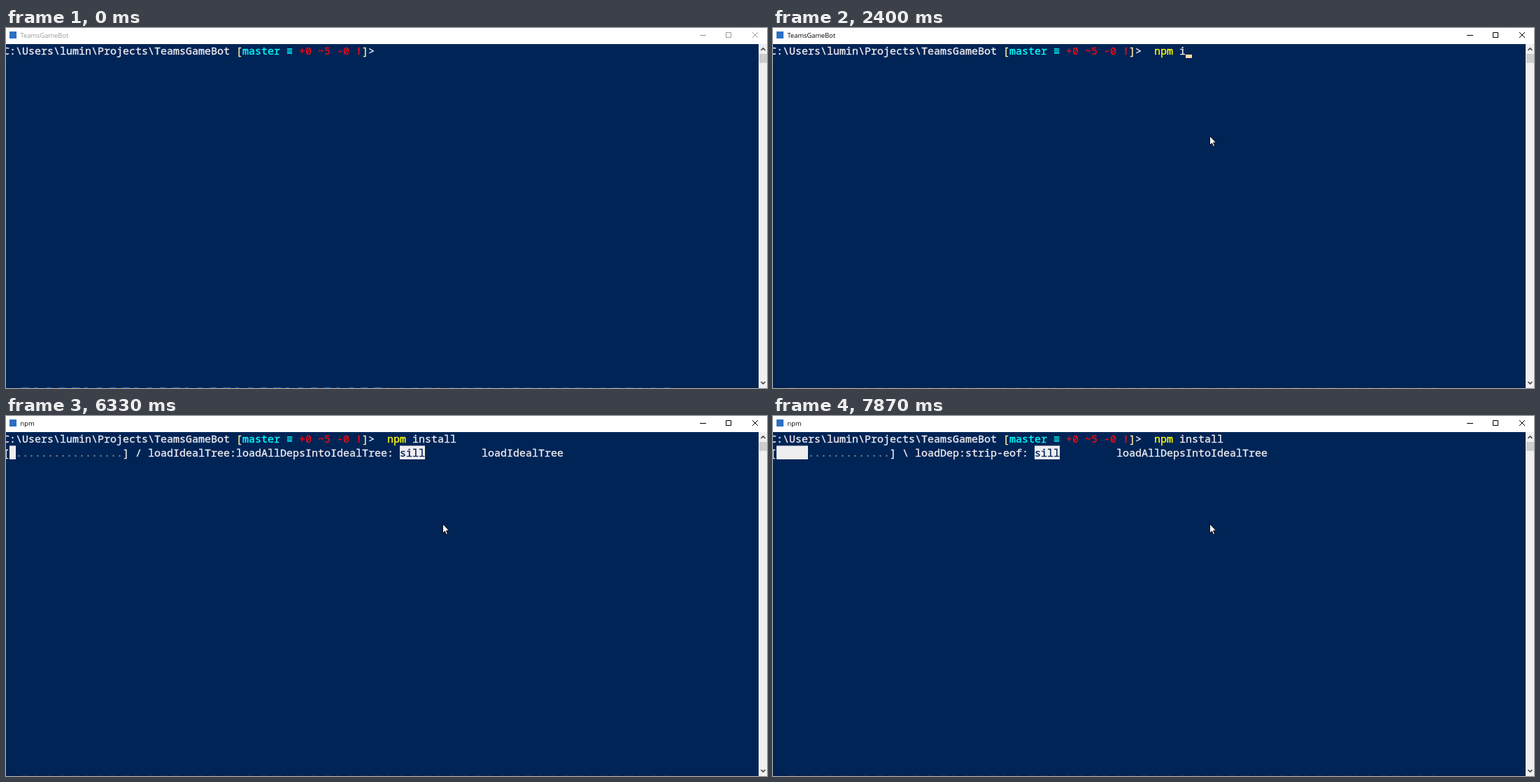
An HTML page with a canvas that plays this animation: 1088 by 515 pixels, repeating every 7.99 s.

```html
<!DOCTYPE html>
<html lang="en">
<head>
<meta charset="utf-8">
<title>Terminal</title>
<style>
  html, body { margin: 0; width: 100%; height: 100%; overflow: hidden; background: #012456; }
  canvas { display: block; }
</style>
</head>
<body>
<canvas id="stage" width="1088" height="515"></canvas>
<script>
const ctx = document.getElementById('stage').getContext('2d');
const LOOP = 7990, TICK = 106, BLINK = 550;
const CELL = 9, LEFT = -4, ROW = 19.6, BASE = 38;
const NAVY = '#012456', PALE = '#eeedf0', YELLOW = '#ffff00', CYAN = '#00ffff', BRACKET = '#f9f1a5';
const RED = '#f00a14', GREEN = '#008000', GRAY = '#7d828c', CREAM = '#fedba9';
const MONO = '15px "Noto Sans Mono", "DejaVu Sans Mono", monospace';
const SANS = '9.3px "Open Sans", "Noto Sans", sans-serif';

// Moments at which the window reacts
const FOCUS = 1080, CARET = 1630, TYPE = 2080, LAST_KEY = 2950, ENTER = 3170, NEW_LINE = 3290, RENAME = 3390;
const CARET_OFF = 3720, PREINSTALL = 4700, LOAD_TREE = 6330, LOAD_DEPS = 7210;

const COMMAND = 'npm install', COMMAND_COL = 61;
const TREE = 'loadAllDepsIntoIdealTree';
const DEPS = ['request', 'glob', 'minimatch', 'resolve', 'semver', 'execa', 'strip-eof'];
const ARROW = new Path2D('M0 0V13L3 10.3L5 15L7 14L5 9.5H9Z');

const ticks = (t, start, last) => Math.min(last, Math.floor((t - start) / TICK));
const glide = (t, start) => Math.max(0, (ticks(t, start, 4) + 1) / 5);
const easeOut = p => 1 - (1 - p) ** 2;
const mix = (a, b, p) => a + (b - a) * p;
const colX = col => LEFT + col * CELL;

function rect(x, y, w, h, color) {
  ctx.fillStyle = color;
  ctx.fillRect(x, y, w, h);
}

function stroke(path, color, width = 1) {
  ctx.strokeStyle = color;
  ctx.lineWidth = width;
  ctx.stroke(new Path2D(path));
}

// Writes text on the character grid and returns the next column
function put(col, row, text, color) {
  const x = colX(col), y = BASE + Math.round(row * ROW);
  ctx.font = MONO;
  ctx.fillStyle = ctx.strokeStyle = color;
  ctx.lineWidth = 0.35;
  ctx.fillText(text, x, y);
  ctx.strokeText(text, x, y);
  return col + text.length;
}

function block(col, count) {
  rect(colX(col), 42.5, count * CELL, 19.5, PALE);
}

function drawWindow(title, active) {
  const ink = active ? '#000' : '#999';
  rect(0, 0, 1088, 515, NAVY);
  rect(0, 0, 1088, 23, '#fff');
  rect(5, 5, 10, 10, '#2c6fc4');
  ctx.font = SANS;
  ctx.fillStyle = ink;
  ctx.fillText(title, 20.5, 14);
  stroke('M992 10.5h9M1029.5 6.5h7v7h-7zM1067 6l8 8m0-8l-8 8', ink);

  // Strip of the desktop showing along the bottom edge
  rect(0, 514, 1076, 1, '#0b1e42');
  for (let x = 22; x < 950; x += 18)
    rect(x, 514, 5 + x % 8, 1, active ? '#162b50' : x < 540 ? '#1f62b4' : '#17407c');

  rect(1076, 23, 12, 492, '#f0f0f0');
  rect(1077, 37, 11, 13, '#cdcdcd');
  stroke('M1079.5 32l3-3l3 3M1079.5 506l3 3l3-3', '#404040', 1.6);
}

function drawPrompt(typed) {
  let col = put(0, 0, 'C:\\Users\\lumin\\Projects\\TeamsGameBot ', PALE);
  col = put(col, 0, '[', BRACKET);
  col = put(col, 0, 'master ≡ ', CYAN);
  col = put(col, 0, '+0 ~5 -0 !', RED);
  col = put(col, 0, ']', BRACKET);
  put(col, 0, '>', PALE);
  const entered = COMMAND.slice(0, typed);
  col = put(COMMAND_COL, 0, entered.slice(0, 3), YELLOW);
  put(col, 0, entered.slice(3), PALE);
}

function drawProgress(done, spinner, task, level, detail) {
  const info = level === 'info';
  put(0, 1, '[', PALE);
  block(1, done);
  put(1 + done, 1, '.'.repeat(18 - done), GRAY);
  let col = put(19, 1, `] ${spinner} ${task}: `, PALE);
  if (!info) block(col, level.length);
  col = put(col, 1, level, info ? GREEN : NAVY);
  put(col + (info ? 11 : 9), 1, detail, PALE);
}

function drawInstall(t) {
  if (t < LOAD_TREE) {
    drawProgress(1, '|', 'preinstall:GameBot', 'info', 'GameBot@1.0.0~preinstall: GameBot@1.0.0');
  } else if (t < LOAD_DEPS) {
    drawProgress(1, '/', 'loadIdealTree:' + TREE, 'sill', 'loadIdealTree');
  } else {
    const k = ticks(t, LOAD_DEPS, DEPS.length - 1);
    drawProgress(Math.round(2 + k / 2), '\\|/'[k % 3], 'loadDep:' + DEPS[k], 'sill', TREE);
  }
}

function drawCaret(t, typed) {
  if (t >= CARET && t < ENTER) rect(colX(COMMAND_COL + typed), 38, CELL, 5, CREAM);
  const lit = Math.floor((t - CARET_OFF) / BLINK) & 1;
  if (t >= NEW_LINE && t < PREINSTALL && lit) rect(LEFT, 57, CELL, 5, CREAM);
}

// Enters at the lower right, turns at the left, then rests near the middle
function drawPointer(t) {
  const enter = glide(t, 100), settle = easeOut(glide(t, 750));
  if (!enter) return;
  ctx.save();
  ctx.translate(0.5 + mix(mix(1068, 446, enter), 624, settle), 0.5 + mix(mix(563, 263, enter), 154, settle));
  ctx.fillStyle = '#fff';
  ctx.fill(ARROW);
  stroke(ARROW, '#000', 0.9);
  ctx.restore();
}

function countTyped(t) {
  if (t < TYPE) return 0;
  return t < LAST_KEY ? 1 + Math.floor(1.5 * ticks(t, TYPE, 6)) : COMMAND.length;
}

function frame(now) {
  const t = now % LOOP, typed = countTyped(t);
  drawWindow(t < RENAME ? 'TeamsGameBot' : 'npm', t >= FOCUS);
  drawPrompt(typed);
  drawCaret(t, typed);
  if (t >= PREINSTALL) drawInstall(t);
  drawPointer(t);
  requestAnimationFrame(frame);
}
requestAnimationFrame(frame);
</script>
</body>
</html>
```
